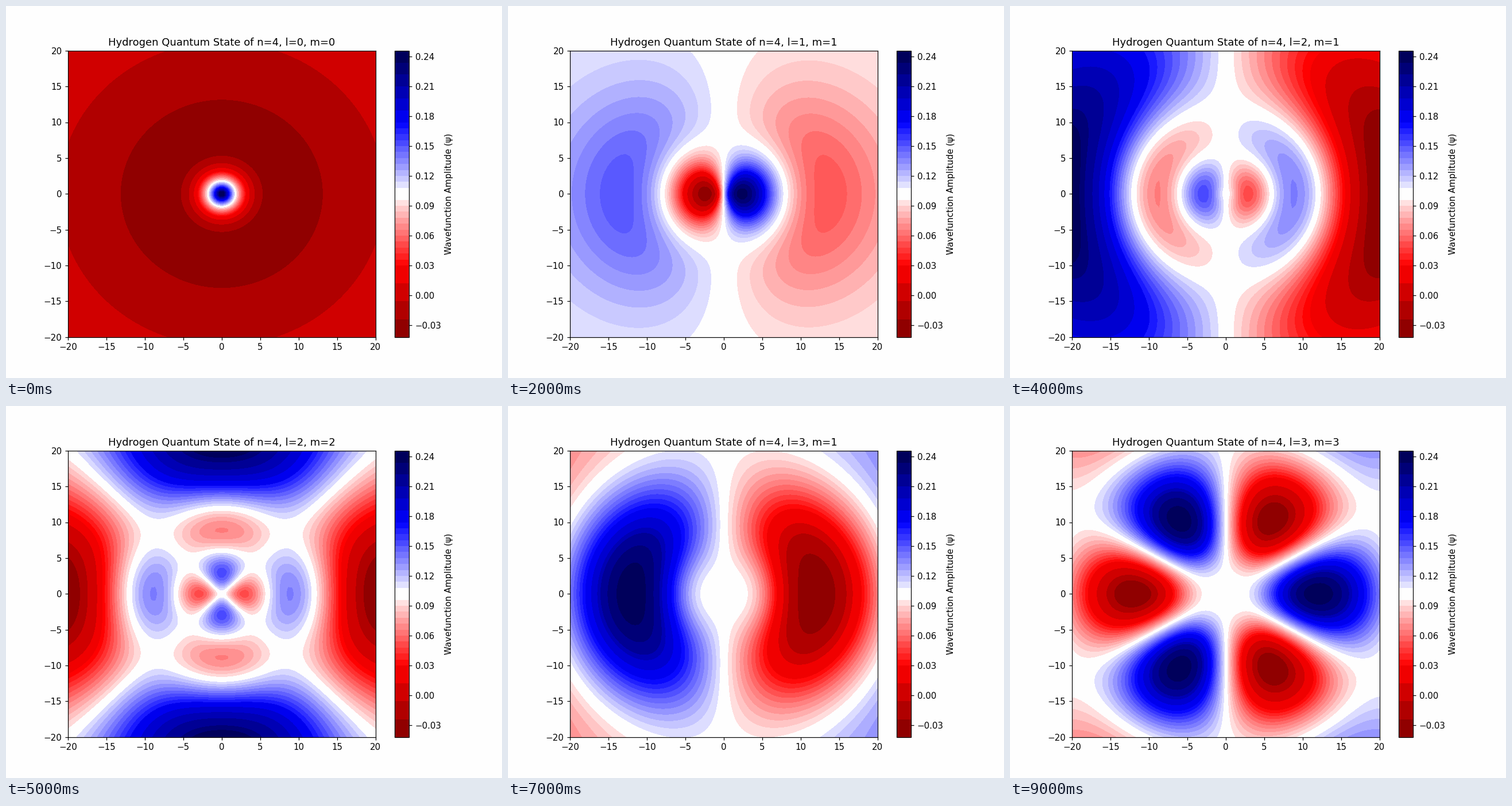
Animation of 864 by 648 pixels, one loop 10000 ms. Source, as a matplotlib script:

```python
import numpy as np
import matplotlib.pyplot as plt
from matplotlib.animation import FuncAnimation
from matplotlib.colors import ListedColormap

plt.rcParams["font.family"] = "DejaVu Sans"
PAPER = "#fefefe"
N = 4
STATES = [(l, m) for l in range(N) for m in range(l + 1)]

axis = np.linspace(-20, 20, 100)
X, Y = np.meshgrid(axis, axis)
R = np.hypot(X, Y)
PHI = np.arctan2(Y, X)


def radial(l, r):
    if l == 0:
        poly = (1 - r / 4) / np.sqrt(4 * np.pi)
    elif l == 1:
        poly = 0.03 * r * (8 - r)
    elif l == 2:
        poly = r**2 * (r - 6) * (12 - r) / 750
    else:
        poly = r**3 * (24 * r - r**2 - 32) / 45000
    return poly * np.exp(-r / 4)


def psi(l, m):
    # The polar factor in the z = 0 plane turns negative for l - m >= 2
    polar = -0.8 if l - m >= 2 else 1
    return polar * radial(l, R) * np.cos(m * PHI)


def stepped_map(size=256):
    """Red-white-blue map with flat steps in its dark ends and middle."""
    f = (np.arange(size) + 0.5) / size
    f = np.where(f < 1 / 4, (np.floor(f * 16) + 0.5) / 16, f)
    f = np.where(f > 3 / 4, (np.floor(f * 24) + 0.5) / 24, f)
    colors = plt.get_cmap("seismic_r")(f)
    colors[np.abs(f - 0.5) < 0.025, :3] = 254 / 255
    return ListedColormap(colors)


CMAP = stepped_map()


def fill(l, m):
    return ax.contourf(X, Y, psi(l, m), 50, cmap=CMAP)


fig, ax = plt.subplots(figsize=(8, 6), dpi=108, facecolor=PAPER)
ax.set_facecolor(PAPER)
shown = [fill(0, 0)]
bar = fig.colorbar(shown[0], ax=ax, ticks=np.arange(-1, 9) * 0.03)
bar.set_label("Wavefunction Amplitude (ψ)")
title = ax.set_title("")


def draw(k):
    l, m = STATES[k]
    shown.pop().remove()
    shown.append(fill(l, m))
    title.set_text(f"Hydrogen Quantum State of n={N}, l={l}, m={m}")
    return []


anim = FuncAnimation(fig, draw, frames=len(STATES), interval=1000,
                     init_func=lambda: draw(0), repeat=True)
plt.show()
```
